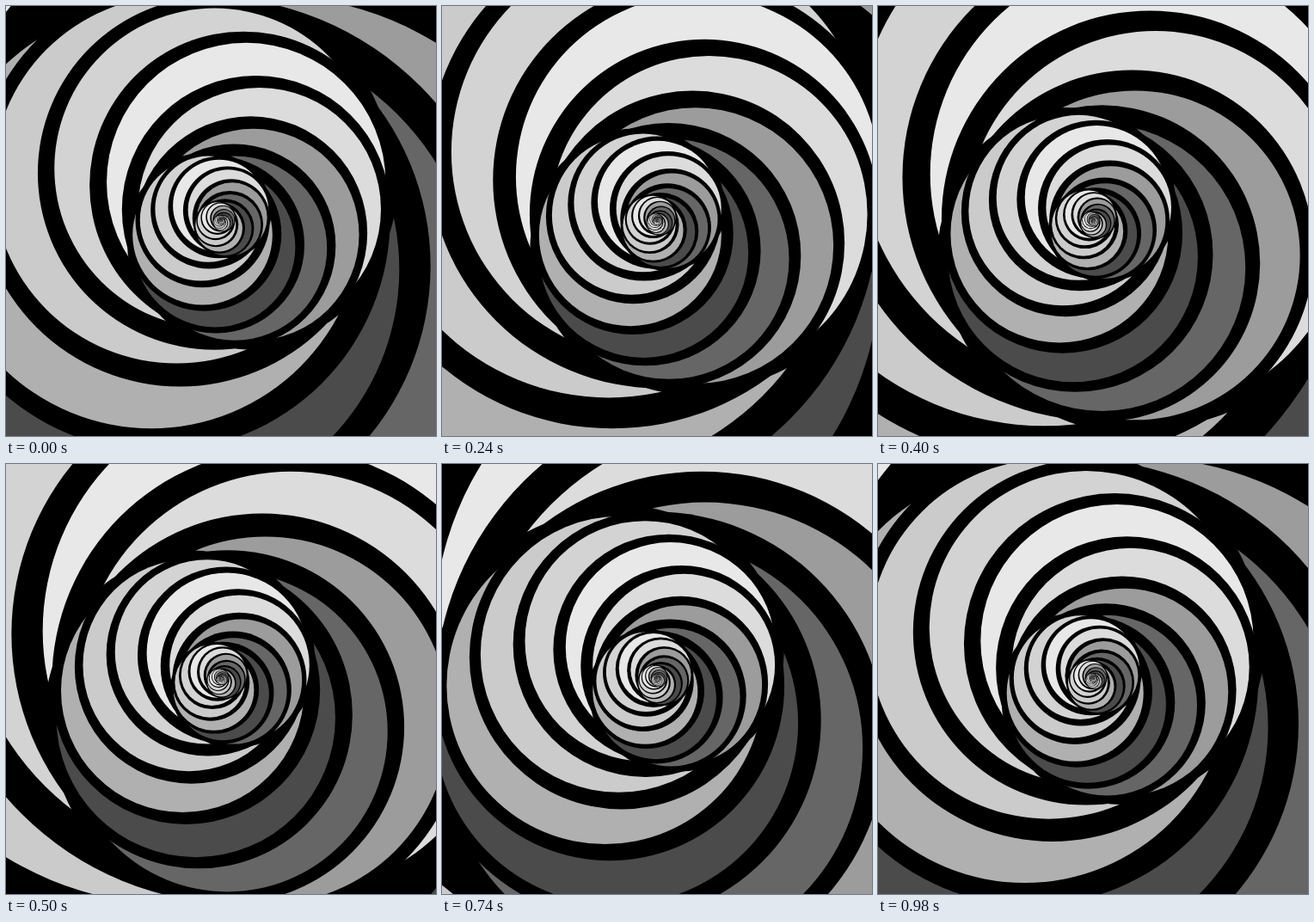
Recreate the animation shown at these times as an HTML page with a canvas. Size 500 by 500 pixels, loop 1 s.

```html
<!DOCTYPE html>
<html>
<head>
<meta charset="utf-8">
<title>Spiral tunnel</title>
<style>
html, body { margin: 0; width: 100%; height: 100%; overflow: hidden; background: #000; }
canvas { display: block; width: 500px; height: 500px; }
</style>
</head>
<body>
<canvas id="stage" width="500" height="500"></canvas>
<script>
const ctx = document.getElementById('stage').getContext('2d');
const LOOP = 1000, TICK = 20;
const shades = ['#b0b0b0', '#cbcbcb', '#d3d3d3', '#e8e8e8', '#dcdcdc', '#9c9c9c', '#666666', '#4b4b4b'];
// Each step inward turns and shrinks the disc; eight steps make one loop.
const TURN = 40 * Math.PI / 180;
const SHRINK = 1.105 / 8;
const START = 143 * Math.PI / 180;
const RADIUS = 81.3;

// Disc whose centre lies at distance d and angle a from the middle
function disc(d, a, r, color) {
  ctx.fillStyle = color;
  ctx.beginPath();
  ctx.arc(250 + d * Math.cos(a), 250 + d * Math.sin(a), r, 0, 2 * Math.PI);
  ctx.fill();
}

function draw(now) {
  const t = Math.floor(now % LOOP / TICK) * TICK / LOOP;
  ctx.fillStyle = '#000';
  ctx.fillRect(0, 0, 500, 500);
  for (let n = -24; n < 48; n++) {
    const step = n - 8 * t;
    const r = RADIUS * Math.exp(-SHRINK * step);
    // Eight turns of 40 degrees fall 40 short of a circle, so a loop advances by 40.
    const a = START + TURN * (n + t);
    disc(0.302 * r, a - 0.015, 1.103 * r, '#000');
    disc(0.331 * r, a, r, shades[(n + 24) % 8]);
  }
  requestAnimationFrame(draw);
}
requestAnimationFrame(draw);
</script>
</body>
</html>
```
